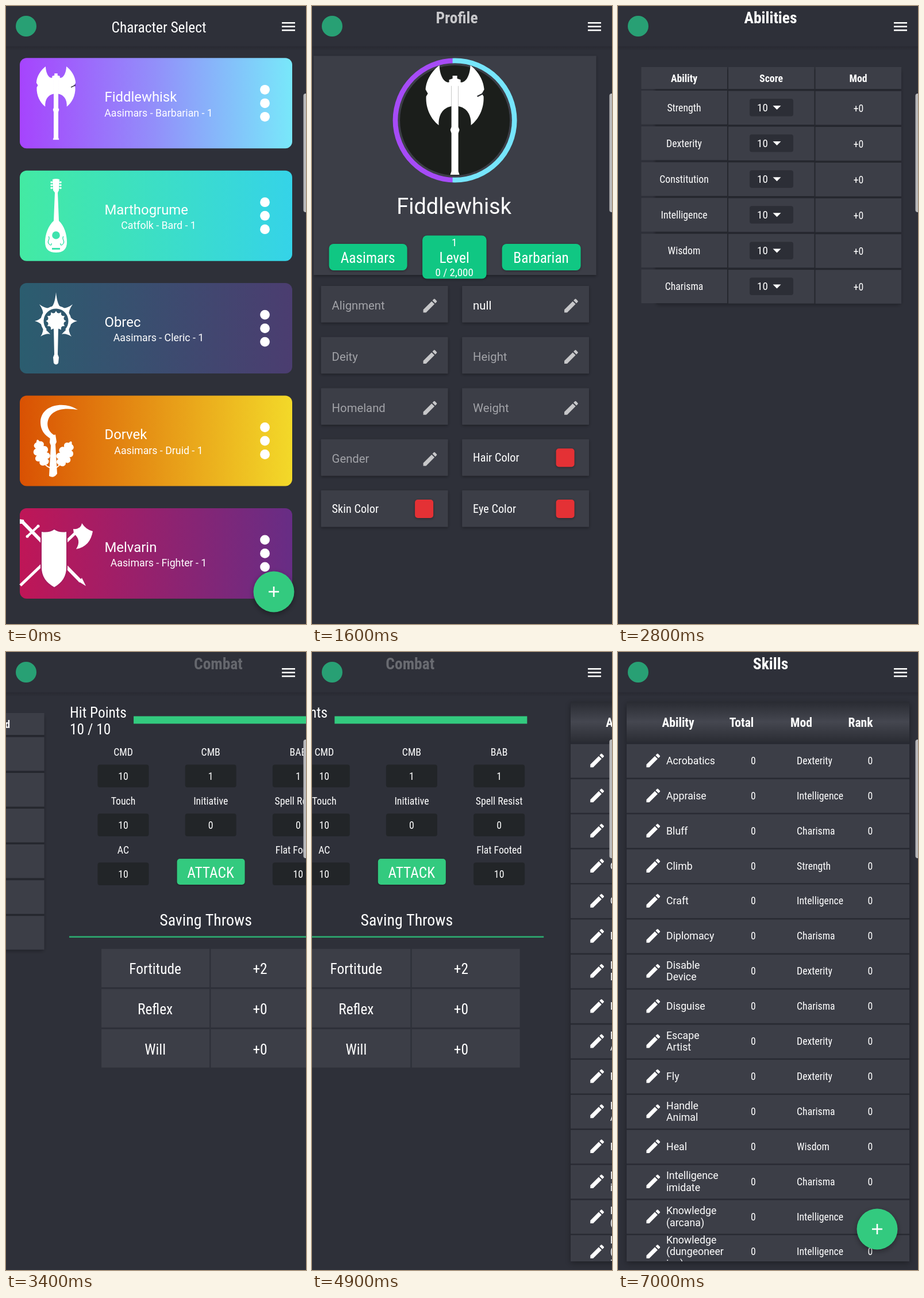
Write an HTML page with a canvas that moves like this. It is 522 by 1073 pixels and loops after 7.2 s.

```html
<!DOCTYPE html>
<html lang="en">
<head>
<meta charset="utf-8">
<title>Character sheet</title>
<style>
  html, body { margin: 0; width: 100%; height: 100%; overflow: hidden; background: #2e3039; }
  canvas { display: block; }
</style>
</head>
<body>
<canvas id="stage" width="522" height="1073"></canvas>
<script>
const ctx = document.getElementById('stage').getContext('2d');
const W = 522, H = 1073, LOOP = 7200, STEP = 100;
const BG = '#2e3039', CELL = '#3c3e47', GREEN = '#33ca7f', WHITE = '#fff';
const HERO = 'Fiddlewhisk';

// ---------- drawing helpers ----------
function setFont(size, { bold = false, narrow = true } = {}) {
  ctx.font = `${bold ? 'bold ' : ''}${size}px ${narrow ? '"Roboto Condensed", ' : ''}Roboto, sans-serif`;
  ctx.fontStretch = narrow ? 'condensed' : 'normal';
}

function measure(narrow) {
  setFont(40, { narrow });
  return ctx.measureText('Character Select').width;
}
// Without a condensed face, one common ratio imitates it.
const narrowScale = measure(true) < measure(false) * 0.97 ? 1 : 0.88;

// y is the middle of the capital letters
function text(str, x, y, size, opts = {}) {
  const { align = 'center', color = WHITE, narrow = true } = opts;
  ctx.save();
  setFont(size, opts);
  ctx.textAlign = align;
  ctx.fillStyle = color;
  ctx.translate(x, y + size * 0.355);
  if (narrow) ctx.scale(narrowScale, 1);
  ctx.fillText(str, 0, 0);
  ctx.restore();
}
const wide = { narrow: false };
const wideLeft = { narrow: false, align: 'left' };

function box(x, y, w, h, r, fill, shadow = 0) {
  ctx.save();
  if (shadow) {
    ctx.shadowColor = 'rgba(0,0,0,.35)';
    ctx.shadowBlur = shadow;
    ctx.shadowOffsetY = shadow / 3;
  }
  ctx.fillStyle = fill;
  ctx.beginPath();
  ctx.roundRect(x, y, w, h, r);
  ctx.fill();
  ctx.restore();
}

function disc(x, y, r, fill = WHITE) {
  ctx.fillStyle = fill;
  ctx.beginPath();
  ctx.arc(x, y, r, 0, Math.PI * 2);
  ctx.fill();
}

function shape(d, fill = WHITE) {
  ctx.fillStyle = fill;
  ctx.fill(new Path2D(d));
}

function stroke(d, width, color = WHITE) {
  ctx.strokeStyle = color;
  ctx.lineWidth = width;
  ctx.stroke(new Path2D(d));
}

function at(x, y, scale, draw) {
  ctx.save();
  ctx.translate(x, y);
  ctx.scale(scale, scale);
  draw();
  ctx.restore();
}

function gradient(x0, y0, x1, y1, colors) {
  const g = ctx.createLinearGradient(x0, y0, x1, y1);
  colors.forEach((c, i) => g.addColorStop(i / (colors.length - 1), c));
  return g;
}

function pencil(x, y, color) {
  at(x - 4, y - 4, 1.32, () => shape('M3 17.25V21h3.75L17.81 9.94l-3.75-3.75zM20.71 7.04a1 1 0 0 0 0-1.41l-2.34-2.34a1 1 0 0 0-1.41 0l-1.83 1.83 3.75 3.75z', color));
}

function addButton(x, y) {
  box(x - 35.5, y - 35.5, 71, 71, 35.5, GREEN, 10);
  ctx.fillStyle = WHITE;
  ctx.fillRect(x - 9, y - 1.3, 18, 2.6);
  ctx.fillRect(x - 1.3, y - 9, 2.6, 18);
}

// ---------- class emblems ----------
const BLADE = 'M-6 28C-16 34-26 22-27 0C-39 9-50 25-51 42L-47 49L-50 54C-51 76-41 94-28 104C-29 86-21 74-6 71Z';
function axe() {
  shape(BLADE);
  ctx.save();
  ctx.scale(-1, 1);
  shape(BLADE);
  ctx.restore();
  shape('M-4 18H4V23L10 25V32L6 36V107L8 112L6 118V184L8 190H-8L-6 184V118L-8 112L-6 107V36L-10 32V25L-4 23Z');
  stroke('M39 54L51 48', 2, '#26282b');
}

function lute() {
  shape('M81 301Q87 299 93 301L92 320L90 324L92 373C101 381 106 396 106 410Q106 428 87 428Q68 428 68 410C68 396 74 381 83 373L85 324L82 320Z');
  for (const y of [306, 311, 316]) {
    stroke(`M79 ${y}H95`, 1.6);
    disc(79, y, 1.7);
    disc(95, y, 1.7);
  }
  const hole = '#3fe3ae';
  disc(87, 398, 6.8, hole);
  ctx.fillStyle = hole;
  ctx.fillRect(80, 420, 14, 3);
  stroke('M74 400C78 405 71 407 74 412S80 415 79 412M100 400C96 405 103 407 100 412S94 415 95 412', 1.4, hole);
}

function mace() {
  ctx.save();
  ctx.translate(87, 547);
  ctx.strokeStyle = WHITE;
  ctx.lineWidth = 5;
  ctx.beginPath();
  ctx.arc(0, 0, 24, Math.PI * 0.77, Math.PI * 2.23);
  ctx.stroke();
  const lengths = [50, 41, 37, 38, 0, 38, 37, 41];
  lengths.forEach((len, i) => {
    ctx.save();
    ctx.rotate(i * Math.PI / 4);
    if (len) shape(`M-9-23Q-2-28 0-${len}Q2-28 9-23Z`);
    ctx.restore();
  });
  for (let i = 0; i < 12; i++) {
    ctx.rotate(Math.PI / 6);
    shape('M-3-13L0-17.5L3-13Z');
  }
  disc(0, 0, 14.2);
  ctx.restore();
  shape('M83 560H91L90 605L92 610L91 620Q87 625 83 620L82 610L84 605Z');
}

function leaf(x, y, angle) {
  ctx.save();
  ctx.translate(x, y);
  ctx.rotate(angle);
  shape('M0 24C-8 25-10 18-7 15C-15 15-15 6-9 4C-16 1-13-8-7-8C-12-15-5-18-3-18Q0-26 3-18C5-18 12-15 7-8C13-8 16 1 9 4C15 6 15 15 7 15C10 18 8 25 0 24Z');
  ctx.restore();
}

function sickle() {
  shape('M125 701C101 685 61 692 60 722C60 739 70 747 79 752L86 746C72 740 67 722 79 709C91 697 111 699 125 701Z');
  shape('M77 747L86 744L88 757L86 761L89 812Q83 821 75 816L78 763L76 758Z');
  leaf(61, 774, -0.3);
  leaf(104, 776, 0.45);
  stroke('M66 793Q70 800 80 803M97 792Q92 800 84 803', 2);
}

function shield() {
  stroke('M25 1006L128 908', 5);
  stroke('M28 895L130 999', 6);
  shape('M126 999L132 993L139 1007Z');
  stroke('M37 921L56 903', 4);
  disc(37, 921, 2.5);
  disc(56, 903, 2.5);
  shape('M24 891L31 892L32 899L24 899Z');
  shape('M117 908C125 909 131 905 132 898Q139 909 151 912C148 929 139 940 122 943C129 932 127 923 118 916Z');
  const d = 'M62 913Q75 915 84 909Q93 915 105 913V975Q105 997 84 1009Q62 997 62 975Z';
  stroke(d, 4, '#a71c5f');
  shape(d);
}

// ---------- screens ----------
const cards = [
  { name: HERO, kind: 'Barbarian', colors: ['#a644fd', '#9290fa', '#78e8fa'], icon: () => at(87, 105, 0.67, axe) },
  { name: 'Marthogrume', race: 'Catfolk', kind: 'Bard', colors: ['#43eaa3', '#35d3e8'], icon: lute },
  { name: 'Obrec', kind: 'Cleric', colors: ['#2b5d6f', '#4b3d70'], icon: mace },
  { name: 'Dorvek', kind: 'Druid', colors: ['#d95103', '#f3d929'], icon: sickle },
  { name: 'Melvarin', kind: 'Fighter', colors: ['#bf1657', '#672d85'], icon: shield }
];

function selectScreen() {
  cards.forEach(({ name, race = 'Aasimars', kind, colors, icon }, i) => {
    const y = 90.3 + i * 195.4;
    box(24, y, 474, 157, 12, gradient(24, 0, 498, 0, colors));
    icon();
    text(name, 171.5, y + 67.5, 23.9, wideLeft);
    text(`${race} - ${kind} - 1`, 265.5, y + 95, 17.76, wide);
    for (const dy of [55, 78.5, 102]) disc(450.5, y + dy, 8.4);
  });
  addButton(466, 1017);
}

function profile() {
  box(15, 86.5, 492, 380.5, 0, CELL, 5);
  disc(261, 198.5, 108, gradient(256.5, 0, 257.5, 0, ['#a64bf7', '#76e5fc']));
  disc(261, 198.5, 99.3, CELL);
  disc(261, 198.5, 95.5, '#1b1e1b');
  at(261, 103, 1, axe);
  text(HERO, 259.5, 348, 37.9, wide);

  const chip = '#10c783';
  box(42, 413, 136, 46, 8, chip, 4);
  box(204.5, 398.5, 111.5, 75, 8, chip, 4);
  box(343, 413, 137, 46, 8, chip, 4);
  text('Aasimars', 109.5, 437, 25.4);
  text('Barbarian', 411, 437, 25.4);
  text('1', 260, 410, 19);
  text('Level', 260, 437, 25.4);
  text('0 / 2,000', 260, 462, 19);

  const fields = ['Alignment', 'null', 'Deity', 'Height', 'Homeland', 'Weight',
    'Gender', 'Hair Color', 'Skin Color', 'Eye Color'];
  fields.forEach((label, i) => {
    const x = 28 + (i % 2) * 245.5, y = 486 + (i >> 1) * 88.75;
    box(x, y, 221, 63.5, 1, CELL, 5);
    if (label.endsWith('Color')) {
      text(label, x + 19, y + 32, 20.3, { align: 'left' });
      box(x + 163.5, y + 16, 32, 32, 5, '#e43135', 4);
    } else {
      text(label, x + 19, y + 34, 20.3, { ...wideLeft, color: label === 'null' ? WHITE : '#a2a3a8' });
      pencil(x + 178, y + 22.5, '#c7c7c9');
    }
  });
}

function abilities() {
  ctx.save();
  ctx.shadowColor = '#1b1c22';
  ctx.shadowBlur = 8;
  ctx.fillStyle = '#25272e';
  ctx.fillRect(67, 112, 424, 406);
  ctx.restore();
  const columns = [40.5, 192, 343.5];
  ['Ability', 'Score', 'Mod'].forEach((label, i) => {
    box(columns[i], 106, 149.5, 38, 0, CELL);
    text(label, columns[i] + 74.5, 125.5, 17.76, { bold: true });
  });
  ['Strength', 'Dexterity', 'Constitution', 'Intelligence', 'Wisdom', 'Charisma'].forEach((label, i) => {
    const y = 147 + i * 62.1, mid = y + 29;
    columns.forEach((x, c) => box(x, y + c * 0.4, 149.5, 58.5, 0, CELL));
    text(label, 115, mid + 0.5, 17.76);
    box(229, mid - 15, 76, 30.5, 4, '#2c2e36');
    text('10', 251.5, mid, 19);
    shape(`M269.5 ${mid - 3}h14l-7 7z`);
    text('+0', 418.5, mid + 1.5, 17.76);
  });
}

function combat() {
  text('Hit Points', 15.5, 105, 25.4, { align: 'left' });
  text('10 / 10', 15.5, 134, 25.4, { align: 'left' });
  ctx.fillStyle = GREEN;
  ctx.fillRect(126.5, 111.5, 335, 13);
  const stats = [['CMD', 10], ['CMB', 1], ['BAB', 1], ['Touch', 10], ['Initiative', 0],
    ['Spell Resist', 0], ['AC', 10], null, ['Flat Footed', 10]];
  stats.forEach((stat, i) => {
    if (!stat) return;
    const x = 108.4 + (i % 3) * 152.2, y = 173.5 + Math.floor(i / 3) * 85;
    text(stat[0], x, y, 17.76);
    box(x - 44.5, y + 22, 89, 39.5, 4, '#222528');
    text(stat[1], x, y + 42.5, 17.76);
  });
  box(202, 359, 118, 45, 5, GREEN, 3);
  text('ATTACK', 260.5, 382.5, 25.4);
  text('Saving Throws', 252, 465.5, 27.9);
  ctx.fillStyle = '#2da46d';
  ctx.fillRect(14.4, 493.2, 476, 2.8);
  [['Fortitude', '+2'], ['Reflex', '+0'], ['Will', '+0']].forEach(([label, value], i) => {
    const y = 515.5 + i * 69.8;
    box(70.5, y, 188, 66.5, 0, CELL);
    box(260.8, y, 188, 66.5, 0, CELL);
    text(label, 164, y + 34.5, 25.4);
    text(value, 346.5, y + 34.5, 25.4);
  });
}

const skillRows = [
  ['Acrobatics', 'Dexterity'], ['Appraise', 'Intelligence'], ['Bluff', 'Charisma'],
  ['Climb', 'Strength'], ['Craft', 'Intelligence'], ['Diplomacy', 'Charisma'],
  ['Disable|Device', 'Dexterity'], ['Disguise', 'Charisma'], ['Escape|Artist', 'Dexterity'],
  ['Fly', 'Dexterity'], ['Handle|Animal', 'Charisma'], ['Heal', 'Wisdom'],
  ['Intelligence|imidate', 'Charisma'], ['Knowledge|(arcana)', 'Intelligence'],
  ['Knowledge|(dungeoneer|ing)', 'Intelligence']
];

function skills() {
  box(15, 86.5, 492, 971, 0, '#292b33', 10);
  ctx.save();
  ctx.beginPath();
  ctx.rect(15, 86, 492, 972);
  ctx.clip();
  box(15, 86, 492, 70, 0, gradient(0, 86, 0, 156, ['#292b32', '#454750', '#2b2d34']));
  [['Ability', 104.5], ['Total', 215], ['Mod', 319], ['Rank', 422]].forEach(([label, x]) =>
    text(label, x, 122, 21.6, { bold: true }));
  skillRows.forEach(([name, mod], i) => {
    const mid = 188.5 + i * 60.9;
    box(15, mid - 28.5, 492, 58.3, 0, CELL);
    pencil(49.5, mid - 12, WHITE);
    const lines = name.split('|');
    lines.forEach((line, n) => text(line, 84, mid + (n - (lines.length - 1) / 2) * 20.4, 17.76, wideLeft));
    text('0', 235.5, mid, 17.76);
    text(mod, 311, mid, 17.76, { align: 'left' });
    text('0', 439, mid, 17.76);
  });
  ctx.restore();
  addButton(451, 1002);
}

// ---------- motion ----------
const pages = [['Profile', profile], ['Abilities', abilities], ['Combat', combat], ['Skills', skills]];
const swipes = [1500, 2920, 4670];

// Distance a page still has to travel, u ms after the finger lands: slow drag, then glide
function remaining(u) {
  if (u <= 0) return W;
  if (u < 220) return W - 60 * (u / 220) ** 2;
  const left = 462 * Math.exp((220 - u) / 165);
  return left < 1 ? 0 : left;
}

function withAlpha(alpha, draw) {
  if (alpha <= 0) return;
  ctx.save();
  ctx.globalAlpha = alpha;
  draw();
  ctx.restore();
}

function drawPages(t, alpha) {
  const scroll = swipes.reduce((sum, start) => sum + W - remaining(t - start), 0);
  pages.forEach(([title, draw], i) => {
    const x = i * W - scroll;
    if (Math.abs(x) >= W) return;
    withAlpha(alpha, () => {
      ctx.translate(x, 0);
      draw();
    });
    withAlpha(alpha / (1 + Math.abs(x) / 35), () =>
      text(title, 265.5 + x * 1.087, 20, 27.5, { bold: true }));
  });
}

function drawChrome() {
  disc(35, 35, 18, '#28a074');
  ctx.fillStyle = WHITE;
  for (const y of [28, 34.4, 40.8]) ctx.fillRect(480, y, 23, 2.6);
  box(517.5, 152, 8, 206, 4, '#bababc');
}

function render(time) {
  const t = Math.floor((time % LOOP) / STEP) * STEP;
  ctx.fillStyle = BG;
  ctx.fillRect(0, 0, W, H);
  ctx.fillStyle = gradient(0, 70, 0, 78, ['rgba(0,0,0,.12)', 'rgba(0,0,0,0)']);
  ctx.fillRect(0, 70, W, 8);

  const opened = Math.min(1, Math.max(0, (t - 200) / 300));
  withAlpha(1 - opened, () => {
    selectScreen();
    text('Character Select', 266, 36.5, 25.4);
  });
  if (opened) drawPages(t, opened);
  drawChrome();
}

const begin = performance.now();
function tick() {
  render(performance.now() - begin);
  requestAnimationFrame(tick);
}
tick();
</script>
</body>
</html>
```
